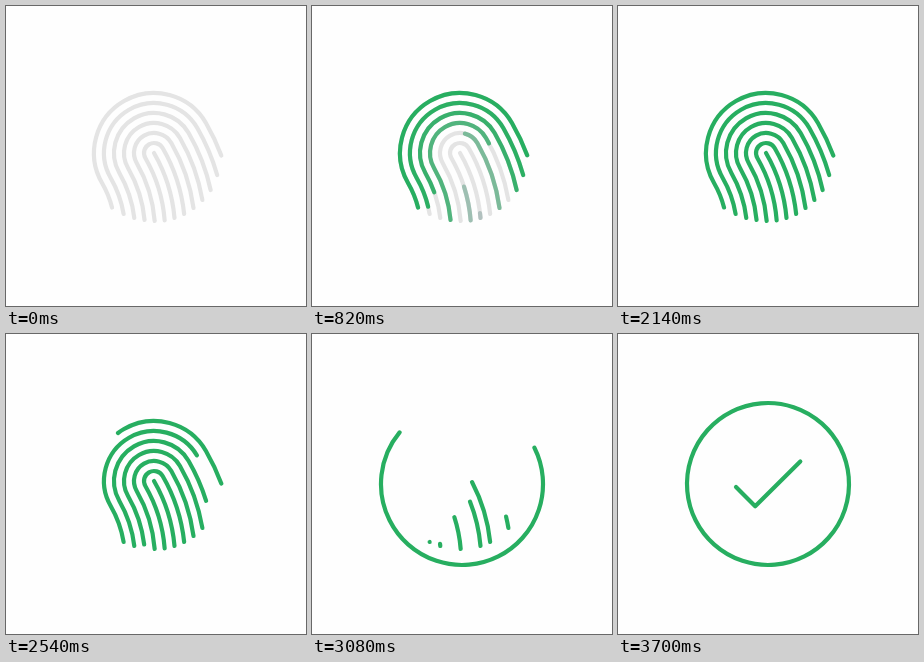
Write an HTML page that moves like this. It is 300 px wide and 300 px high and loops after 4240 ms.

```html
<!DOCTYPE html>
<html lang="en">
<head>
<meta charset="utf-8">
<title>Fingerprint check</title>
<style>
  html, body { margin: 0; width: 100%; height: 100%; overflow: hidden; background: #fefefe; }
  svg { display: block; width: 100vw; height: 100vh; }
  path { fill: none; stroke-width: 4.2; stroke-linecap: round; stroke-linejoin: round; }
</style>
</head>
<body>
<svg id="stage" viewBox="0 0 300 300"></svg>
<script>
const LOOP = 4240, STAGGER = 97, RIDGE_TIME = 900;
const ERASE_START = 2105, CIRCLE_START = 2720, CIRCLE_TIME = 900;
const CHECK_START = 3290, CHECK_TIME = 400;
const SILVER = [189, 195, 199], GREEN = [39, 174, 96], PALE = [228, 228, 228];

const stage = document.getElementById('stage');
const rgb = c => `rgb(${c.map(Math.round).join()})`;
const mix = (a, b, p) => a.map((v, i) => v + (b[i] - v) * p);
const clamp = x => Math.min(1, Math.max(0, x));
const easeInOut = u => u < 0.5 ? 4 * u ** 3 : 1 - 4 * (1 - u) ** 3;

// The curve cubic-bezier(.25, .1, .25, 1), solved by bisection.
function ease(u) {
  let lo = 0, hi = 1;
  for (let i = 0; i < 24; i++) {
    const s = (lo + hi) / 2;
    if (0.75 * s * (1 - s) + s ** 3 < u) lo = s; else hi = s;
  }
  const s = (lo + hi) / 2;
  return 0.3 * s * (1 - s) ** 2 + 3 * s * s * (1 - s) + s ** 3;
}

function addPath(d, color) {
  const el = document.createElementNS('http://www.w3.org/2000/svg', 'path');
  el.setAttribute('d', d);
  el.setAttribute('stroke', rgb(color));
  stage.append(el);
  return { el, length: el.getTotalLength() };
}

function showRange({ el, length }, from, to) {
  const visible = to - from > 1e-6;
  el.style.display = visible ? '' : 'none';
  if (!visible) return;
  el.setAttribute('stroke-dasharray', `${(to - from) * length} ${length * 2}`);
  el.setAttribute('stroke-dashoffset', -from * length);
}

// Ridges: half circles around the core, continued by arcs around a far pivot.
const core = { x: 148, y: 147 };
const axis = { x: -Math.cos(Math.PI / 6), y: 0.5 };
const REACH = 157.5;
const pivot = { x: core.x + REACH * axis.x, y: core.y + REACH * axis.y };
const endY = [201.5, 208, 212, 214, 215, 214.3, 212, 208, 202, 194, 184, 169, 149.5];

const onAxis = r => `${core.x + r * axis.x} ${core.y + r * axis.y}`;
function ridgeEnd(k) {
  const radius = REACH + 10 * k, y = endY[k + 6];
  return `${pivot.x + Math.sqrt(radius ** 2 - (y - pivot.y) ** 2)} ${y}`;
}
function ridgePath(k) {
  if (k === 0) return `M${onAxis(0)}A${REACH} ${REACH} 0 0 1 ${ridgeEnd(0)}`;
  const r = 10 * k, inner = REACH - r, outer = REACH + r;
  return `M${ridgeEnd(-k)}A${inner} ${inner} 0 0 0 ${onAxis(r)}` +
    `A${r} ${r} 0 0 1 ${onAxis(-r)}A${outer} ${outer} 0 0 1 ${ridgeEnd(k)}`;
}

const shapes = [6, 5, 4, 3, 2, 1, 0].map(ridgePath);
const fillBackward = [0, 1, 1, 0, 1, 0, 1];
const eraseBackward = [0, 1, 1, 0, 1, 0, 0];
const bases = shapes.map(d => addPath(d, PALE));
const ridges = shapes.map(d => addPath(d, GREEN));

const R = 81, tilt = -26.6 * Math.PI / 180;
const dx = R * Math.cos(tilt), dy = R * Math.sin(tilt);
const circle = addPath(`M${150 + dx} ${150 + dy}A${R} ${R} 0 0 1 ${150 - dx} ${150 - dy}` +
  `A${R} ${R} 0 0 1 ${150 + dx} ${150 + dy}`, GREEN);
const check = addPath('M118 153L137.2 172.3L182.3 127.5', GREEN);

function draw(t) {
  bases.forEach(b => b.el.style.display = t < ERASE_START ? '' : 'none');
  ridges.forEach((ridge, i) => {
    const delay = i * STAGGER;
    const filled = easeInOut(clamp((t - delay) / RIDGE_TIME));
    const erased = easeInOut(clamp((t - ERASE_START - delay) / RIDGE_TIME));
    ridge.el.setAttribute('stroke', rgb(mix(SILVER, GREEN, filled)));
    if (erased > 0) {
      if (eraseBackward[i]) showRange(ridge, 0, 1 - erased);
      else showRange(ridge, erased, 1);
    } else if (fillBackward[i]) showRange(ridge, 1 - filled, 1);
    else showRange(ridge, 0, filled);
  });
  showRange(circle, 0, ease(clamp((t - CIRCLE_START) / CIRCLE_TIME)));
  showRange(check, 0, easeInOut(clamp((t - CHECK_START) / CHECK_TIME)));
}

let origin;
function tick(now) {
  origin ??= now;
  draw((now - origin) % LOOP);
  requestAnimationFrame(tick);
}
draw(0);
requestAnimationFrame(tick);
</script>
</body>
</html>
```
